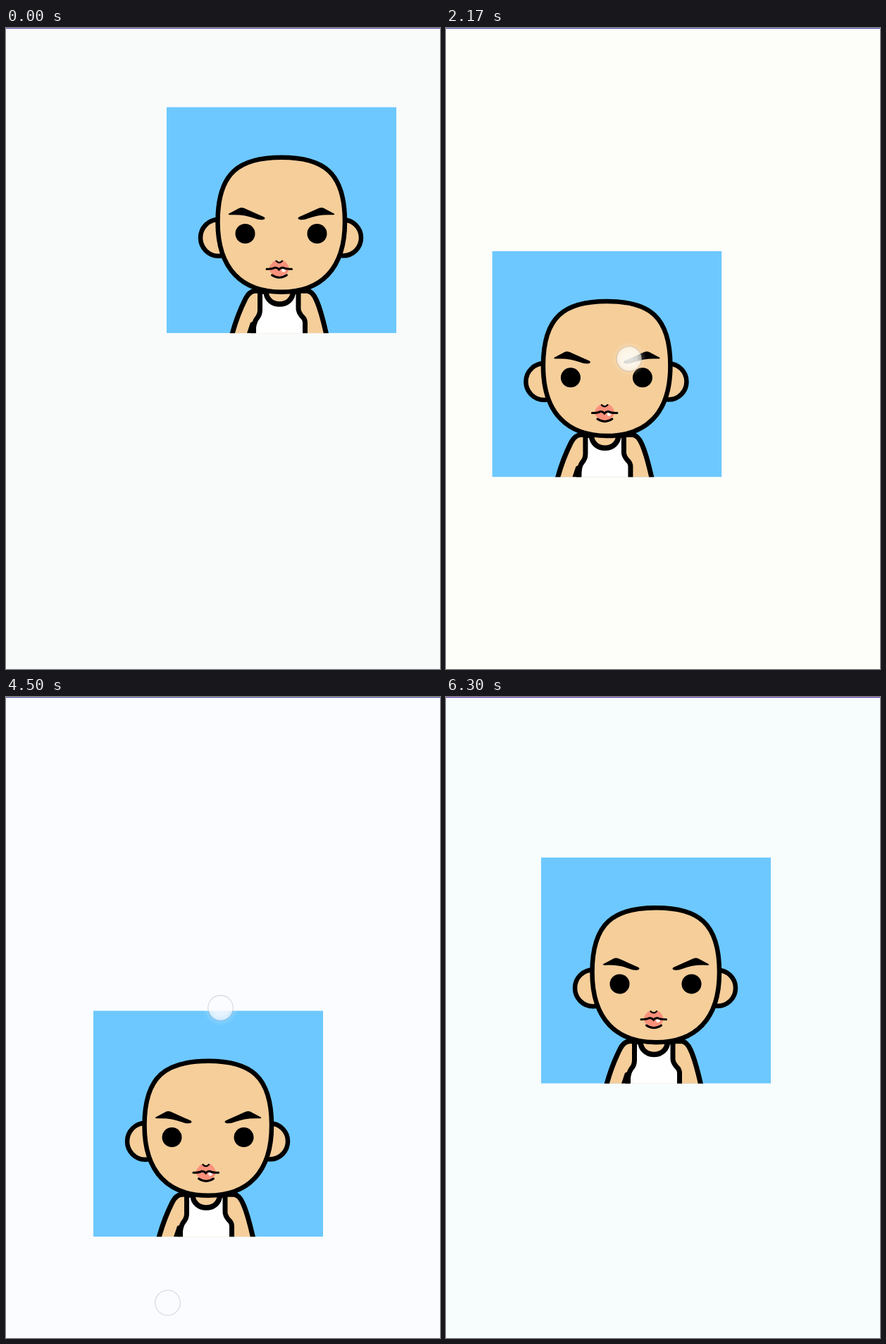
Animation, 616 px wide and 910 px high, one loop 6370 ms. Source, as an HTML page:

```html
<!DOCTYPE html>
<html lang="en">
<head>
<meta charset="utf-8">
<title>Dragging an avatar</title>
<style>
html, body { margin: 0; width: 100%; height: 100%; overflow: hidden; }
svg { display: block; width: 100%; height: 100%; }
</style>
</head>
<body>
<svg id="stage" viewBox="0 0 616 910">
  <defs>
    <clipPath id="frame"><rect width="326" height="321"/></clipPath>
    <radialGradient id="fill">
      <stop offset="0" stop-color="currentColor" stop-opacity=".86"/>
      <stop offset=".6" stop-color="currentColor" stop-opacity=".8"/>
      <stop offset="1" stop-color="currentColor" stop-opacity=".6"/>
    </radialGradient>
    <radialGradient id="glow">
      <stop offset=".68" stop-color="currentColor" stop-opacity=".2"/>
      <stop offset="1" stop-color="currentColor" stop-opacity="0"/>
    </radialGradient>
    <path id="brow" d="M88 151.500L103 143.500Q106 142 110 143.500L138 156Q141 158 138 159.500Q132 161 125 158Q110 152 91 153Q87 153 88 151.500Z"/>
    <g id="touch">
      <circle r="25" fill="url(#glow)"/>
      <circle r="17.8" fill="url(#fill)" stroke="#6e6070" stroke-opacity=".25" stroke-width="1.1"/>
    </g>
  </defs>

  <rect id="paper" width="616" height="910" fill="currentColor"/>

  <g id="avatar" clip-path="url(#frame)">
    <rect width="326" height="321" fill="#6dc8ff"/>
    <g fill="#f5ce9a" stroke="#000" stroke-width="6.500">
      <path stroke-width="7" d="M92.500 324C98 303 106 284 112 272Q117 262 125 261H200Q207 262 212 273C219 288 223 306 227 324"/>
      <path fill="#fff" stroke-width="7" d="M132.500 262V288Q132.500 295 128 300Q123 306 122.500 326H196.500V308Q197 301 192 297Q187 291 187 286V262Z"/>
      <path stroke-width="7.500" d="M141 261C141 286 179.500 286 179.500 261"/>
      <circle cx="74" cy="185.500" r="26"/>
      <circle cx="250.500" cy="185.500" r="25.500"/>
      <path d="M163 71.500C222 71.500 253 92 253 163C253 231 218 262.500 163 262.500C108 262.500 72.500 231 72.500 163C72.500 92 104 71.500 163 71.500Z"/>
    </g>
    <path d="M114 321L119 306L127 302V321Z"/>
    <use href="#brow"/>
    <use href="#brow" transform="matrix(-1 0 0 1 326 0)"/>
    <circle cx="111.500" cy="179.700" r="14"/>
    <circle cx="213.500" cy="179.700" r="14"/>
    <path fill="#fb917b" d="M145 229Q149 219 155.500 217.500Q160 222 164.500 217.500Q171 219 174 229Q172 240 160 241Q148 240 145 229Z"/>
    <circle cx="166" cy="231.500" r="2.800" fill="#fff3ec"/>
    <g fill="none" stroke="#000" stroke-width="3" stroke-linecap="round">
      <path d="M142 230Q150 230 153.500 228Q157 227.500 159.500 230.500Q162 227.500 165.500 228Q169 230 177.500 230"/>
      <path d="M149.500 238.500Q160 245.500 170.500 238.500"/>
      <path stroke-width="2.300" d="M155.500 218.500Q160 223 164 218.500"/>
    </g>
  </g>

  <use id="touch1" href="#touch"/>
  <use id="touch2" href="#touch"/>
  <rect id="line" width="616" height="1" fill="currentColor"/>
</svg>

<script>
const LOOP = 6370;
const $ = id => document.getElementById(id);
const clamp = v => Math.max(0, Math.min(1, v));

// Each key is [time, ...values]; slopes are limited so nothing overshoots.
function track(keys) {
  const rate = (i, c) => (keys[i + 1][c] - keys[i][c]) / (keys[i + 1][0] - keys[i][0]);
  const slope = (i, c) => {
    if (i === 0 || i === keys.length - 1) return 0;
    const a = rate(i - 1, c), b = rate(i, c);
    return a * b > 0 ? 2 * a * b / (a + b) : 0;
  };
  return t => {
    const last = keys.length - 1;
    if (t <= keys[0][0]) return keys[0].slice(1);
    if (t >= keys[last][0]) return keys[last].slice(1);
    const i = keys.findIndex(k => k[0] > t) - 1;
    const a = keys[i], b = keys[i + 1], span = b[0] - a[0], u = (t - a[0]) / span;
    const ease = u * u * (3 - 2 * u);
    return a.slice(1).map((v, n) => {
      const c = n + 1;
      return v + (b[c] - v) * ease
        + span * u * (1 - u) * ((1 - u) * slope(i, c) - u * slope(i + 1, c));
    });
  };
}

const tint = keys => track(keys.map(([t, hex]) =>
  [t, ...[1, 3, 5].map(p => parseInt(hex.slice(p, p + 2), 16))]));

const avatarAt = track([
  [1820, -2, 1], [2470, 119, 565], [3000, 120, 565.5], [3850, 120, 565],
  [4000, 120, 558], [4500, 124, 445.6], [4950, 131, 290], [5260, 135, 228.6], [5700, 135, 227.7]
]);
const upperAt = track([
  [3850, 296, 691], [4000, 296, 677], [4500, 304.5, 442], [4950, 321, 125], [5260, 331, 5]
]);
const lowerAt = track([
  [3800, 229, 855], [4000, 229, 856], [4500, 229.5, 860], [5060, 226, 871], [5260, 225, 873.5]
]);

const paper = tint([
  [0, '#f9fbfa'], [1820, '#fdfcf6'], [2520, '#fdfdfb'], [4000, '#fdfdfb'],
  [4500, '#fbfcff'], [5260, '#f7fdff'], [6300, '#f7fdfd']
]);
const line = tint([
  [0, '#5448a8'], [1820, '#4030c0'], [2520, '#3f58a8'], [4000, '#54549c'],
  [4500, '#3f4f98'], [5260, '#5a2fb5'], [6300, '#5a2fb0']
]);

const place = (id, [x, y]) => $(id).setAttribute('transform', `translate(${x} ${y})`);
const paint = (id, rgb) => $(id).setAttribute('color', `rgb(${rgb.map(Math.round)})`);
const shown = (t, on, off) => clamp((t - on) / 100) * clamp((off - t) / 100);

function draw(t) {
  const pos = t < 110 ? [228, 112.3] : avatarAt(t);
  const single = t < 3600;
  const pair = shown(t, 3750, 5880);

  paint('stage', paper(t));
  paint('line', line(t));
  place('avatar', pos);
  place('touch1', single ? [pos[0] + 194.5, pos[1] + 153] : upperAt(t));
  place('touch2', lowerAt(t));
  $('touch1').setAttribute('opacity', single ? shown(t, 1340, 3460) : pair);
  $('touch2').setAttribute('opacity', pair);
}

const start = performance.now();
function tick() {
  draw((performance.now() - start) % LOOP);
  requestAnimationFrame(tick);
}
tick();
</script>
</body>
</html>
```
